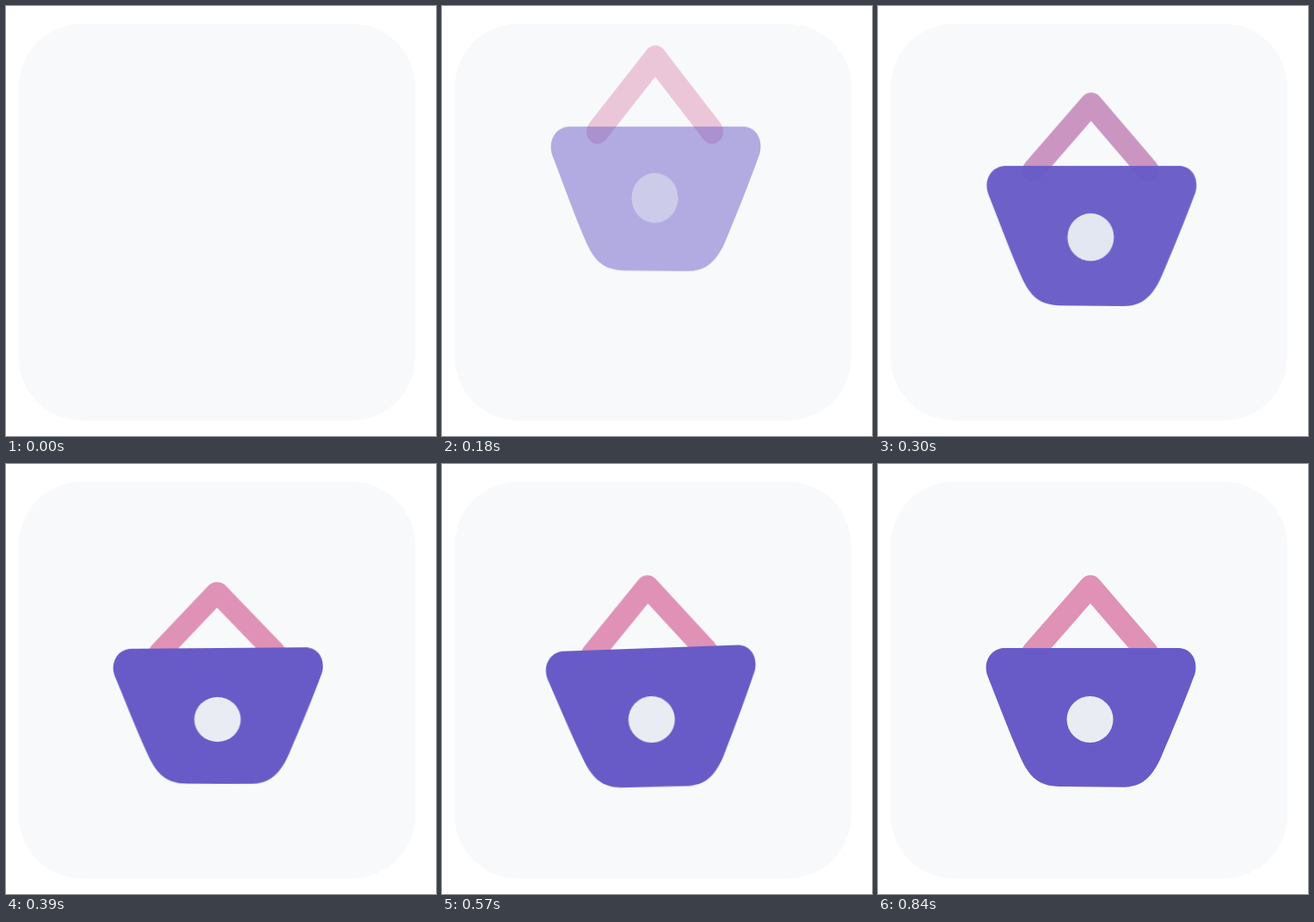
These frames come from a looping animation (500x500 px, 1.71 s). An HTML page:

```html
<!DOCTYPE html>
<html lang="en">
<head>
<meta charset="utf-8">
<title>Basket</title>
<style>
  html, body { margin: 0; width: 100%; height: 100%; overflow: hidden; background: #fff; }
  svg { display: block; width: 100%; height: 100%; }

  .tilt, .drop, .part { animation: 1710ms linear infinite; }
  .tilt { animation-name: tilt; transform-origin: 247px 375px; }
  .drop { animation-name: drop; }
  .part { transform-origin: 247px 214px; }
  .handle { animation-name: fade, handle, tint; fill: none; stroke: #df91b6; stroke-width: 26; stroke-linecap: round; stroke-linejoin: round; }
  .body { animation-name: fade, body; fill: #685bc7; }
  .dot { animation-name: fade, dot; fill: #e9edf3; transform-origin: 246.5px 297px; }

  @keyframes fade {
    0%, 4.386% { opacity: 0; }
    10.526% { opacity: .49; }
    17.544% { opacity: .96; }
    19.298%, 100% { opacity: 1; }
  }
  @keyframes drop {
    0%, 5.263% { transform: translate(1px, -80px); animation-timing-function: cubic-bezier(.4, 0, .67, .25); }
    10.526% { transform: translate(1px, -74px); animation-timing-function: cubic-bezier(.33, .18, .67, .68); }
    17.544% { transform: translate(.8px, -28.5px); animation-timing-function: cubic-bezier(.33, .39, .67, .84); }
    22.807%, 100% { transform: none; }
  }
  @keyframes tilt {
    0%, 19.298% { transform: rotate(0deg); animation-timing-function: ease-in; }
    22.807% { transform: rotate(-.4deg); animation-timing-function: cubic-bezier(.3, .35, .6, 1); }
    34.211% { transform: rotate(-2.02deg); animation-timing-function: cubic-bezier(.4, 0, .5, .95); }
    42.105% { transform: rotate(-.12deg); animation-timing-function: ease-out; }
    49.123%, 100% { transform: rotate(0deg); }
  }

  /* stretch while falling, squash on landing */
  @keyframes handle {
    0%, 5.263% { transform: scaleY(1.12); }
    10.526% { transform: scaleY(1.115); }
    17.544% { transform: scaleY(1.006); }
    22.807% { transform: scaleY(.906); animation-timing-function: ease-in-out; }
    31.579%, 100% { transform: scaleY(1); }
  }
  @keyframes body {
    0%, 5.263% { transform: scaleY(1.045); }
    10.526% { transform: scaleY(1.04); }
    17.544% { transform: scaleY(1.009); }
    22.807% { transform: scaleY(.978); animation-timing-function: ease-in-out; }
    31.579%, 100% { transform: scaleY(1); }
  }
  @keyframes dot {
    0%, 5.263% { transform: scaleY(1.085); }
    10.526% { transform: scaleY(1.074); }
    17.544% { transform: scaleY(1.028); }
    22.807% { transform: scaleY(.963); animation-timing-function: ease-in-out; }
    31.579%, 100% { transform: scaleY(1); }
  }
  @keyframes tint {
    0%, 12.5% { stroke: #df91b6; }
    17.544% { stroke: #c991c0; }
    21%, 100% { stroke: #df91b6; }
  }
</style>
</head>
<body>
<svg viewBox="0 0 500 500">
  <rect x="14.7" y="20.7" width="461.3" height="461.3" rx="74" fill="#f8f9fb"/>
  <g class="tilt">
    <g class="drop">
      <path class="part handle" d="M180 219 L247 142.2 L313 219"/>
      <path class="part body" d="M148 214 H349 C361 214 369.5 223 369.5 236 C369.5 241 368.5 245 367 248 C355 280 342 311 330 339 C319 365 306 376 284 375.8 L211 375 C187 374.5 176 364 166 342 C153 313 142 283 128 248 C126.5 244 125.6 241 125.6 236 C126.5 222 136 214 148 214 Z"/>
      <circle class="part dot" cx="246.5" cy="297" r="27"/>
    </g>
  </g>
</svg>
</body>
</html>
```
